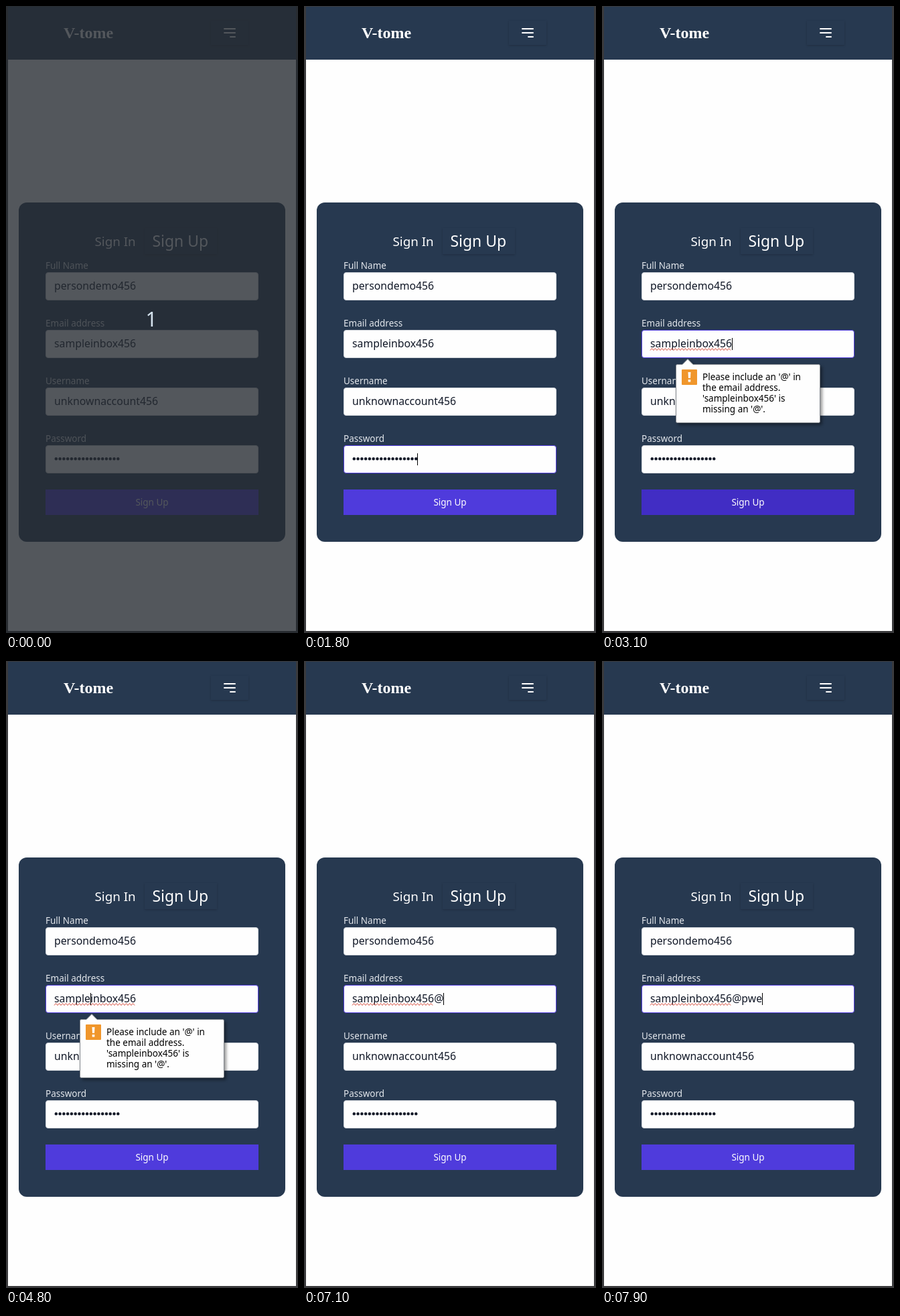
An HTML page that plays this animation: 436x935 px, repeating every 8000 ms.

```html
<!DOCTYPE html>
<html lang="en">
<head>
<meta charset="utf-8">
<title>Sign up form</title>
<style>
  html, body { margin: 0; width: 100%; height: 100%; overflow: hidden; background: #fefefe; }
  svg { display: block; width: 436px; height: 935px; }
  text { font-family: "Noto Sans", "Open Sans", sans-serif; white-space: pre; }
  .brand { font: bold 24px "Liberation Serif", serif; fill: #fff; }
  .tab, .action { fill: #fff; font-weight: 500; }
  .label { font-size: 13.5px; font-weight: 500; fill: #e3e7ec; }
  .value { font-size: 15.8px; fill: #111827; }
  .hint { font-size: 13.5px; fill: #000; }
  .soft { filter: drop-shadow(0 1px 1.5px rgba(0, 0, 0, .2)); }
</style>
</head>
<body>
<svg id="stage" viewBox="0 0 436 935" xmlns="http://www.w3.org/2000/svg"></svg>
<script>
const NS = "http://www.w3.org/2000/svg";
const NAVY = "#273950", INDIGO = "#4f3bdc", GREY = "#d1d5db";
const EMAIL = "sampleinbox456";
const LOOP = 8000, STEP = 100;
const stage = document.getElementById("stage");

function add(tag, attrs, parent = stage) {
  const node = document.createElementNS(NS, tag);
  for (const key in attrs) node.setAttribute(key, attrs[key]);
  parent.appendChild(node);
  return node;
}

function rect(x, y, width, height, fill, more = {}, parent = stage) {
  return add("rect", { x, y, width, height, fill, ...more }, parent);
}

function text(x, y, content, cls, more = {}, parent = stage) {
  const node = add("text", { x, y, class: cls, ...more }, parent);
  node.textContent = content;
  return node;
}

function field(y, label, value) {
  text(59, y - 5, label, "label");
  const box = rect(59.5, y + .5, 317, 41, "#fefefe", { rx: 3.5, stroke: GREY });
  return { box, value: text(72, y + 26, value, "value") };
}

// Page and header
rect(0, 0, 436, 935, "#fefefe");
rect(0, 0, 436, 80, NAVY);
text(86, 48, "V-tome", "brand");
rect(306, 22, 56, 36, NAVY, { class: "soft" });
add("path", {
  d: "M326 34H342M326 40H342M335 46H342",
  stroke: "#fff", "stroke-width": 2, "stroke-linecap": "round"
});

// Form card
rect(19, 293, 398, 506, NAVY, { rx: 12 });
rect(207, 331, 108, 39, NAVY, { class: "soft" });
text(132.5, 358, "Sign In", "tab", { "font-size": 18.8 });
text(218.5, 359, "Sign Up", "tab", { "font-size": 22.9 });
field(397, "Full Name", "persondemo456");
const email = field(483, "Email address", EMAIL);
field(569, "Username", "unknownaccount456");
const password = field(655, "Password", "");
for (let i = 0; i < 17; i++) {
  add("circle", { cx: 74.8 + i * 5.78, cy: 675.3, r: 2.2, fill: "#111827" });
}
const button = rect(59, 721, 318, 38, INDIGO);
text(218, 745, "Sign Up", "action", { "font-size": 13.5, "text-anchor": "middle" });

const widthOf = count => count ? email.value.getSubStringLength(0, count) : 0;

// Spelling mark and caret
const wave = add("path", { fill: "none", stroke: "#d8503f", "stroke-width": 1 });
const caret = rect(0, 0, 1, 18, "#000");

// Validation bubble
const bubble = add("g", {});
add("path", {
  d: "M112.5 534.5H120L128 526.5L136 534.5H323.5Q325.5 534.5 325.5 536.5V619.5" +
     "Q325.5 621.5 323.5 621.5H112.5Q110.5 621.5 110.5 619.5V536.5Q110.5 534.5 112.5 534.5Z",
  fill: "#fefefe", stroke: "#7d8288",
  style: "filter:drop-shadow(3px 3px 2px rgba(0,0,0,.4))"
}, bubble);
rect(119, 542, 23, 23, "#f0962b", { rx: 1 }, bubble);
add("path", { d: "M128.5 546H132.5L132 555H129Z", fill: "#fff" }, bubble);
rect(128.7, 557, 3.6, 3.6, "#fff", {}, bubble);
["Please include an '@' in", "the email address.", `'${EMAIL}' is`, "missing an '@'."]
  .forEach((line, i) => text(150, 558 + i * 16, line, "hint", {}, bubble));

// Window edge
const edge = add("path", {
  d: "M0 0H436V935H0ZM3 1V932H433V1Z", fill: "#3a3a3c", "fill-rule": "evenodd"
});

// Dimmed countdown
const dim = add("g", {});
rect(0, 0, 436, 935, "rgba(39,43,50,.794)", {}, dim);
text(217, 478, "1", "", { "font-size": 30, fill: "#d5e3ee", "text-anchor": "middle" }, dim);

// [time, characters before the caret]
const carets = [[2100, 14], [4800, 6], [5400, 11], [6400, 12], [6600, 13], [6700, 14],
                [7100, 15], [7300, 16], [7600, 17], [7800, 18]];
const at = (table, t) => table.reduce((value, [from, v]) => t >= from ? v : value, 0);
const show = (node, on) => node.setAttribute("display", on ? "inline" : "none");

function zigzag(width) {
  let d = "M72 513.5";
  for (let x = 2.5, up = true; x <= width; x += 2.5, up = !up) {
    d += `L${72 + x} ${up ? 510.5 : 513.5}`;
  }
  return d;
}

function buttonColor(t) {
  if (t < 1900 || t >= 4800) return INDIGO;
  const p = Math.min(1, (t - 1800) / 200);
  const mix = (a, b) => Math.round(a + (b - a) * p);
  return `rgb(${mix(79, 65)},${mix(59, 45)},${mix(220, 196)})`;
}

function draw(now) {
  const t = Math.floor((now % LOOP) / STEP) * STEP;
  const inPassword = t >= 1800 && t < 2100;
  const inEmail = t >= 2100;
  const place = at(carets, t);

  show(dim, t < 100);
  edge.setAttribute("fill", t < 100 ? "#303032" : "#3a3a3c");
  email.value.textContent = EMAIL + "@pwe".slice(0, Math.max(0, place - EMAIL.length));
  email.box.setAttribute("stroke", inEmail ? INDIGO : GREY);
  password.box.setAttribute("stroke", inPassword ? INDIGO : GREY);
  button.setAttribute("fill", buttonColor(t));

  show(caret, inPassword || inEmail);
  caret.setAttribute("x", inPassword ? 169 : Math.round(71.7 + widthOf(place)));
  caret.setAttribute("y", inPassword ? 667 : 495);

  show(wave, t >= 2700);
  wave.setAttribute("d", zigzag(widthOf(EMAIL.length)));

  show(bubble, t >= 2100 && t < 7100);
  const age = Math.max(0, t - 2100);
  const scale = age >= 1000 ? 1 : 1 - .06 * Math.exp(-age / 110);
  bubble.setAttribute("opacity", age >= 600 ? 1 : 1 - Math.exp(-(age + 50) / 85));
  bubble.setAttribute("transform",
    `translate(128 526) scale(${scale}) translate(-128 -526)`);
}

const start = performance.now();
function tick() {
  draw(performance.now() - start);
  requestAnimationFrame(tick);
}
tick();
</script>
</body>
</html>
```
